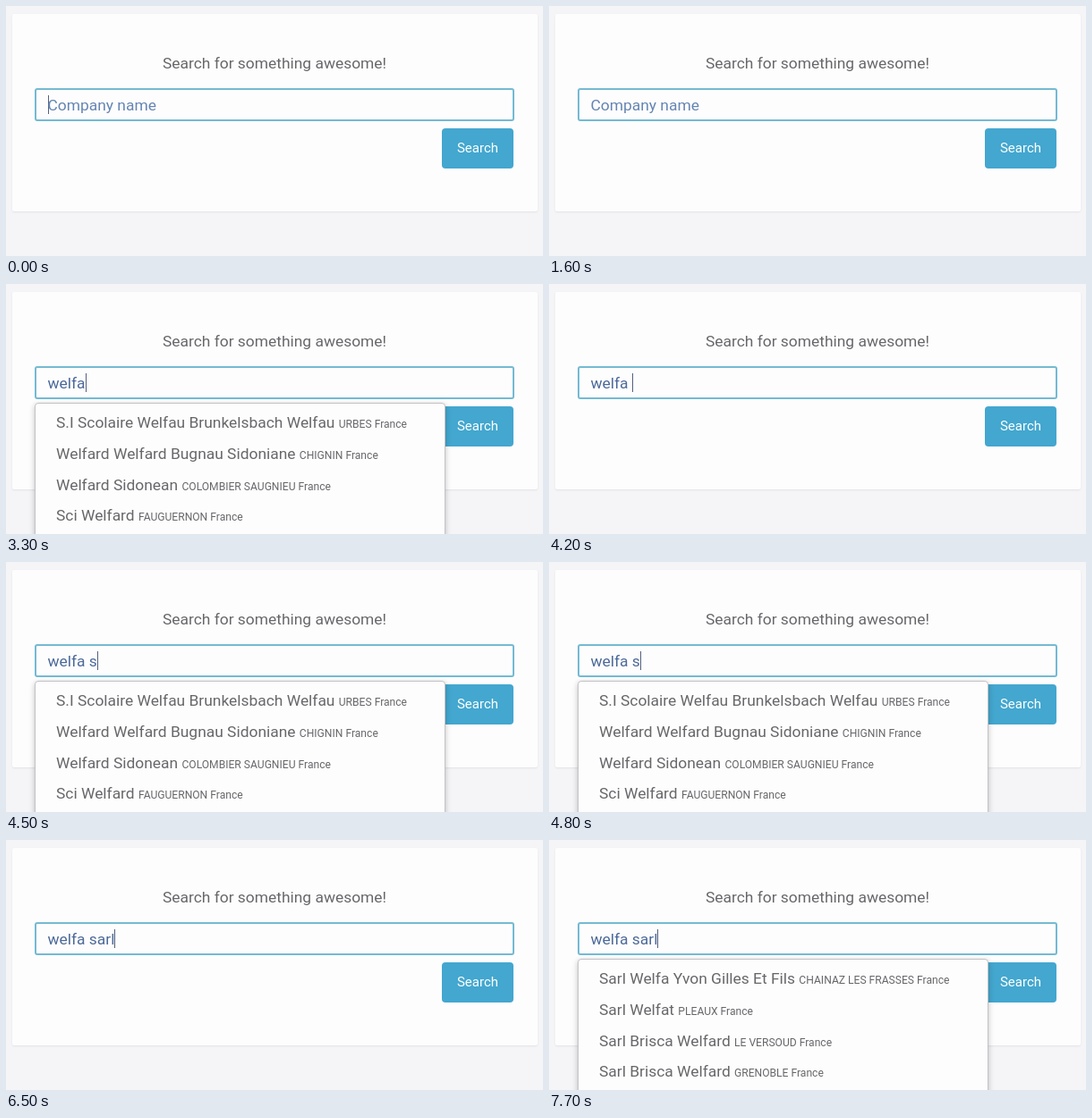
An HTML page that plays this animation: 600x280 px, repeating every 8000 ms.

```html
<!DOCTYPE html>
<html lang="en">
<head>
<meta charset="utf-8">
<title>Company search</title>
<style>
  html, body { margin: 0; width: 100%; height: 100%; overflow: hidden; background: #f5f4f7; }
  #stage {
    position: relative; width: 600px; height: 280px; overflow: hidden;
    font: 17.4px/22px Roboto, sans-serif; color: #67676a; white-space: pre;
  }
  #stage > * { position: absolute; box-sizing: border-box; }
  .card {
    left: 7px; top: 9px; width: 587px; height: 221px;
    background: #fefdfe; border-radius: 2px; box-shadow: 0 1px 2px #e3e2e7;
  }
  .title { left: 0; top: 53px; width: 600px; text-align: center; }
  .field {
    left: 32px; top: 92px; width: 536px; height: 37px;
    border: 2px solid #74bad2; border-radius: 3px; background: #fefdfe;
  }
  .line { left: 46.5px; top: 100px; height: 22px; display: flex; }
  #typed { color: #4b6998; }
  #typed.empty { color: #6485b2; order: 1; }
  #caret { width: 1px; height: 21px; margin-right: -1px; background: #536080; }
  .button {
    left: 487px; top: 137px; width: 80px; height: 45px; border-radius: 4px;
    background: #43a7cf; color: #fff; font-size: 15px; line-height: 44px; text-align: center;
  }
  #menu {
    left: 32px; top: 133px; width: 459px; height: 180px; padding: 10px 0 0 23px;
    background: #fefdfe; border: 1px solid #c2c1c5; border-radius: 4px;
    box-shadow: 0 2px 6px rgba(0, 0, 0, .24);
  }
  #menu div { height: 34.8px; }
  #menu small { font-size: 12.1px; }
</style>
</head>
<body>
<div id="stage">
  <div class="card"></div>
  <div class="title">Search for something awesome!</div>
  <div class="field"></div>
  <div class="line"><span id="typed"></span><i id="caret"></i><span id="hint"></span></div>
  <div class="button">Search</div>
  <div id="menu"></div>
</div>
<script>
const LOOP = 8000, STEP = 100;

const lists = {
  first: [
    ["We", "PAUILLAC"],
    ["We & We", "PARIS 19"],
    ["We We Sa Fruits", "PANTIN"],
    ["Sci We And We", "GENNEVILLIERS"]
  ],
  short: [
    ["We & We", "PARIS 19"],
    ["Sci We And We", "GENNEVILLIERS"],
    ["We We Sa Fruits", "PANTIN"],
    ["We", "PAUILLAC"]
  ],
  family: [
    ["S.I Scolaire Welfau Brunkelsbach Welfau", "URBES"],
    ["Welfard Welfard Bugnau Sidoniane", "CHIGNIN"],
    ["Welfard Sidonean", "COLOMBIER SAUGNIEU"],
    ["Sci Welfard", "FAUGUERNON"]
  ],
  sarl: [
    ["Sarl Welfa Yvon Gilles Et Fils", "CHAINAZ LES FRASSES"],
    ["Sarl Welfat", "PLEAUX"],
    ["Sarl Brisca Welfard", "LE VERSOUD"],
    ["Sarl Brisca Welfard", "GRENOBLE"]
  ]
};

// [start ms, typed text, open list, inline completion]
const states = [
  [0, ""],
  [1700, "w", "first", "e"],
  [2200, "we", "short", " & We"],
  [2800, "wel", "family"],
  [3000, "welf", "family"],
  [3300, "welfa", "family"],
  [3600, "welfa "],
  [4400, "welfa s", "family"],
  [5000, "welfa s"],
  [5400, "welfa sa"],
  [5500, "welfa sar"],
  [5900, "welfa sar", "sarl"],
  [6300, "welfa sarl"],
  [6700, "welfa sarl", "sarl"]
];

// Caret fades: [start ms, duration ms, final opacity]
const fades = [
  [0, 0, 1], [100, 300, 0], [700, 200, 1], [1100, 300, 0], [1700, 0, 1],
  [6800, 300, 0], [7400, 200, 1]
];

const $ = id => document.getElementById(id);
const latest = (rows, t) => rows.filter(r => r[0] <= t).pop();

function caretOpacity(t) {
  const [start, span, end] = latest(fades, t);
  const p = span ? Math.min(1, (t - start + STEP) / span) : 1;
  return end ? p : 1 - p;
}

function menuRow([name, city]) {
  const row = document.createElement("div");
  const place = document.createElement("small");
  place.textContent = city + " France";
  row.append(name + " ", place);
  return row;
}

function showState([, text, list, hint = ""]) {
  $("typed").textContent = text || "Company name";
  $("typed").className = text ? "" : "empty";
  $("hint").textContent = hint;
  $("menu").style.display = list ? "" : "none";
  $("menu").replaceChildren(...(lists[list] || []).map(menuRow));
}

let shown;
function draw(now) {
  const t = Math.floor(now % LOOP / STEP) * STEP;
  const state = latest(states, t);
  if (state !== shown) showState(shown = state);
  $("caret").style.opacity = caretOpacity(t);
}

let begin;
function tick(now) {
  begin ??= now;
  draw(now - begin);
  requestAnimationFrame(tick);
}
draw(0);
requestAnimationFrame(tick);
</script>
</body>
</html>
```
